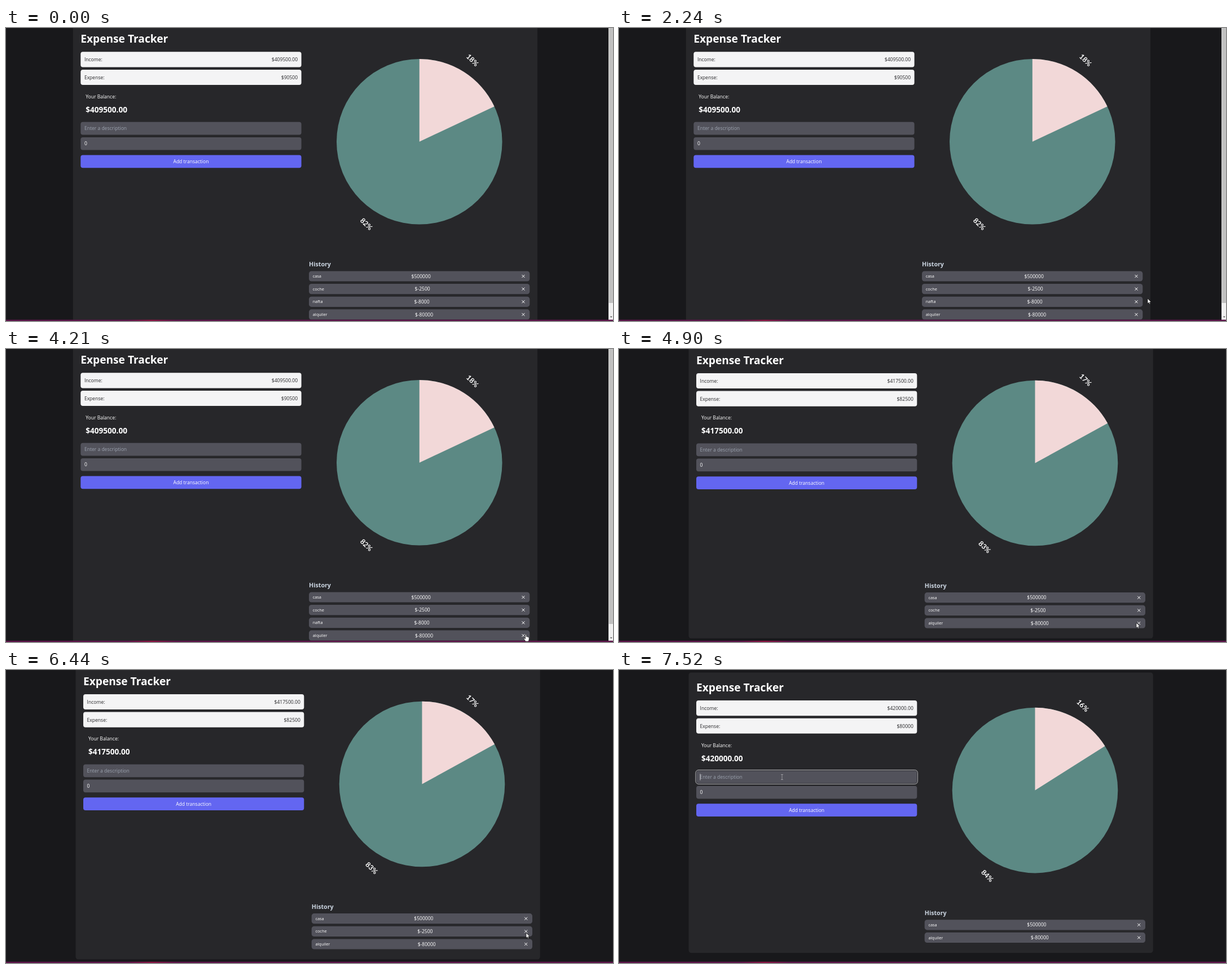
Write an HTML page that moves like this. It is 1076x520 px and loops after 7990 ms.

```html
<!DOCTYPE html>
<html lang="en">
<head>
<meta charset="utf-8">
<title>Expense Tracker</title>
<style>
  html, body { margin: 0; width: 100%; height: 100%; overflow: hidden; background: #18181b; }
  svg { display: block; font: 450 8.55px "Open Sans", "Noto Sans", sans-serif; }
  .title { font-size: 19.15px; font-weight: 700; }
  .balance { font-size: 13.6px; font-weight: 700; }
  .heading { font-size: 10.7px; font-weight: 700; }
  .name { font-size: 7.4px; }
  .percent { font: 700 12.4px Lato, sans-serif; }
</style>
</head>
<body>
<svg width="1076" height="520" viewBox="0 0 1076 520">
  <defs>
    <linearGradient id="barFill">
      <stop offset=".2" stop-color="#5c1449"/>
      <stop offset=".24" stop-color="#8a1442"/>
      <stop offset=".28" stop-color="#5c1449"/>
    </linearGradient>
  </defs>
  <rect width="1076" height="520" fill="#18181b"/>
  <g id="page"></g>
  <g id="scrollbar">
    <rect x="1068" width="8" height="518" fill="#f1f1f1"/>
    <rect x="1068.5" width="7.5" height="488" fill="#c1c1c1"/>
    <path d="M1070.8 511.8h4l-2 2.3z" fill="#505050"/>
  </g>
  <rect y="517.7" width="1076" height="2.3" fill="url(#barFill)"/>
  <g id="cursor" stroke-width=".6">
    <path id="arrow" d="M0 0V9L2.1 7.2 3.5 10.2 4.9 9.6 3.6 6.7 6.3 6.5Z" fill="#fff" stroke="#000"/>
    <path id="hand" d="M-1 .8Q0-.6 1 .8V4Q2.4 3.4 3 4.6 4 3.8 4.4 5 5.5 4.6 5.6 6V9Q5.4 11 4.4 12.4H-.6Q-1.6 10.4-3.6 7.8-4 6.4-2.6 6.6L-1 8Z" fill="#fff" stroke="#000"/>
    <path id="beam" d="M-2-4.5H2M0-4.5V4.5M-2 4.5H2" fill="none" stroke="#c4c4c8"/>
  </g>
</svg>
<script>
const LOOP = 7990, ENTER_AT = 110, FOCUS_AT = 7460;
const LEFT = 132.3, RIGHT = 537, WIDTH = 391.3;
const FIELD_Y = 166.8, FIELD_H = 22.7;
const FIRST_ROW = 431.4, ROW_H = 18.2, ROW_STEP = 22.65, REMOVE_X = 917;
const $ = id => document.getElementById(id);

const casa = { name: "casa", amount: 500000 };
const coche = { name: "coche", amount: -2500 };
const nafta = { name: "nafta", amount: -8000 };
const alquiler = { name: "alquiler", amount: -80000 };

const views = [
  { from: 0, dx: 0, dy: 0, rows: [casa, coche, nafta, alquiler] },
  { from: 4900, dx: 4.7, dy: .7, rows: [casa, coche, alquiler] },
  { from: 6510, dx: 4.7, dy: 11.8, rows: [casa, alquiler] },
];

const moves = [
  { start: 110, end: 620, x: 812, y: 268 },
  { start: 620, end: 930, x: 829, y: 346 },
  { start: 930, end: 1690, x: 931, y: 494 },
  { start: 1690, end: 2240, x: 937, y: 480 },
  { start: 2580, end: 3680, x: 921.5, y: 506.5 },
  { start: 4210, end: 4700, x: 917, y: 486 },
  { start: 5490, end: 5980, x: 922, y: 466.5 },
  { start: 6630, end: 7190, x: 289, y: 190 },
];

const box = (x, y, w, h, fill, r = 4) =>
  `<rect x="${x}" y="${y}" width="${w}" height="${h}" rx="${r}" fill="${fill}"/>`;
const outline = (grow, color) =>
  `<rect x="${LEFT - grow}" y="${FIELD_Y - grow}" width="${WIDTH + 2 * grow}" height="${FIELD_H + 2 * grow}"
    rx="${4 + grow}" fill="none" stroke="${color}" stroke-width=".8"/>`;
const text = (x, y, s, { fill = "#fff", anchor = "start", style = "" } = {}) =>
  `<text x="${x}" y="${y}" fill="${fill}" text-anchor="${anchor}" class="${style}">${s}</text>`;

const ruler = document.createElement("canvas").getContext("2d");
ruler.font = '450 7.4px "Open Sans", "Noto Sans", sans-serif';

function summary(y, label, value) {
  const fill = "#27272a";
  return box(LEFT, y, WIDTH, 27.1, "#f4f4f5")
    + text(LEFT + 6.6, y + 17, label, { fill })
    + text(LEFT + WIDTH - 6.5, y + 17, value, { fill, anchor: "end" });
}

function field(y, value, fill) {
  return box(LEFT, y, WIDTH, FIELD_H, "#52525b") + text(LEFT + 6.6, y + 14.4, value, { fill });
}

function pie(share) {
  const cx = 732.8, cy = 201.8, r = 146.8;
  const angle = share / 50 * Math.PI;
  const label = (value, side) => {
    const x = cx + side * 175.5 * Math.sin(angle / 2);
    const y = cy + .7 - side * 172.3 * Math.cos(angle / 2);
    return `<g transform="translate(${x} ${y}) rotate(45)">`
      + text(0, 4.4, value + "%", { anchor: "middle", style: "percent" }) + "</g>";
  };
  return `<circle cx="${cx}" cy="${cy}" r="${r}" fill="#5c8984"/>
    <path d="M${cx} ${cy}v${-r}A${r} ${r} 0 0 1 ${cx + r * Math.sin(angle)} ${cy - r * Math.cos(angle)}Z" fill="#f2d8d8"/>`
    + label(share, 1) + label(100 - share, -1);
}

function historyRow({ name, amount }, i) {
  const y = FIRST_ROW + i * ROW_STEP, x = RIGHT + 6.7;
  const middle = (x + ruler.measureText(name).width + REMOVE_X - 4.6) / 2;
  return box(RIGHT, y, WIDTH, ROW_H, "#52525b", 4.5)
    + text(x, y + 11.7, name, { style: "name" })
    + text(middle, y + 12.2, "$" + amount, { anchor: "middle" })
    + `<path d="M${REMOVE_X - 2.5} ${y + 6.6}l5 5m0-5l-5 5" stroke="#fff"/>`;
}

function page({ rows }, focused) {
  const total = rows.reduce((sum, row) => sum + row.amount, 0);
  const spent = casa.amount - total;
  const balance = `$${total}.00`;
  const bottom = FIRST_ROW + rows.length * ROW_STEP + 13.5;
  const focus = outline(.3, "#18181b") + outline(1.1, "#e4e4e7")
    + `<path d="M139.3 172.5v11.4" stroke="#fff" stroke-width=".7"/>`;
  return box(118.8, -7.3, 823.2, bottom + 7.3, "#27272a", 4.5)
    + text(LEFT, 25.9, "Expense Tracker", { style: "title" })
    + summary(42.3, "Income:", balance)
    + summary(73.9, "Expense:", "$" + spent)
    + text(141.2, 124.8, "Your Balance:")
    + text(141.2, 149.8, balance, { style: "balance" })
    + field(FIELD_Y, "Enter a description", "#9ca3af")
    + field(193.9, "0")
    + box(LEFT, 225.5, WIDTH, FIELD_H, "#6366f1")
    + text(LEFT + WIDTH / 2, 240, "Add transaction", { anchor: "middle" })
    + (focused ? focus : "")
    + pie(Math.round(100 * spent / casa.amount))
    + text(RIGHT, 423.4, "History", { fill: "#cbd5e1", style: "heading" })
    + rows.map(historyRow).join("");
}

function pointerAt(t) {
  const i = moves.findLastIndex(m => t >= m.start);
  const origin = moves[i - 1] ?? { x: 1056, y: 509 };
  const { start, end, x, y } = moves[i];
  const p = Math.min(1, (t - start) / (end - start));
  const ease = p * p * (3 - 2 * p);
  return { x: origin.x + (x - origin.x) * ease, y: origin.y + (y - origin.y) * ease, start };
}

// The hover shape is refreshed only once the pointer moves after a row is removed.
function pointerShape({ x, y, start }, view) {
  const px = x - view.dx, py = y - view.dy;
  if (px < LEFT + WIDTH && py > FIELD_Y && py < FIELD_Y + FIELD_H) return "beam";
  const overRemove = view.rows.some((_, i) => {
    const offset = py - (FIRST_ROW + i * ROW_STEP + ROW_H / 2);
    return offset > -7 && offset < 2.4;
  });
  return overRemove && Math.abs(px - REMOVE_X) < 5 && start >= view.from ? "hand" : "arrow";
}

let shown = "";
function render(t) {
  const view = views.findLast(v => t >= v.from);
  const focused = t >= FOCUS_AT;
  const key = view.from + "|" + focused;
  if (key !== shown) {
    shown = key;
    $("page").innerHTML = page(view, focused);
    $("page").setAttribute("transform", `translate(${view.dx} ${view.dy})`);
    $("scrollbar").style.display = view === views[0] ? "" : "none";
  }
  $("cursor").style.display = t < ENTER_AT ? "none" : "";
  if (t < ENTER_AT) return;
  const pointer = pointerAt(t);
  const shape = pointerShape(pointer, view);
  for (const id of ["arrow", "hand", "beam"]) $(id).style.display = id === shape ? "" : "none";
  $("cursor").setAttribute("transform", `translate(${pointer.x} ${pointer.y})`);
}

const began = performance.now();
function tick() {
  render((performance.now() - began) % LOOP);
  requestAnimationFrame(tick);
}
tick();
</script>
</body>
</html>
```
